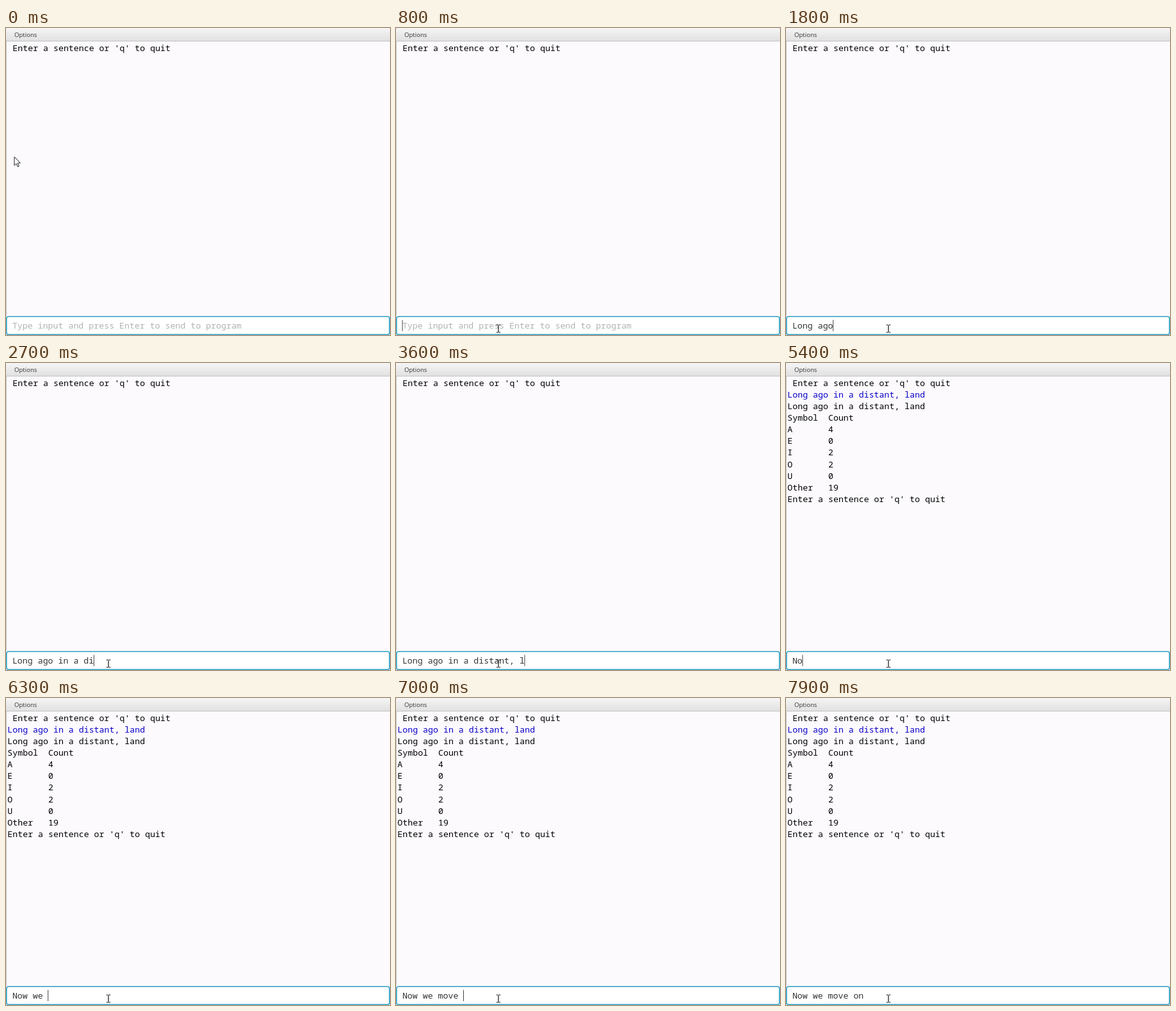
Recreate the animation shown at these times as an HTML page with a canvas. Size 600 by 479 pixels, loop 8 s.

```html
<!DOCTYPE html>
<html lang="en">
<head>
<meta charset="utf-8">
<title>Vowel counter console</title>
<style>
html, body { margin: 0; width: 100%; height: 100%; overflow: hidden; background: #fcfafd; }
canvas { display: block; }
</style>
</head>
<body>
<canvas id="stage"></canvas>
<script>
const W = 600, H = 479, LOOP = 8000, STEP = 100;
const MONO = '13.27px "Noto Sans Mono", "DejaVu Sans Mono", monospace';
const MENU = '9.6px "Open Sans", "Noto Sans", sans-serif';
const CHAR = 7.96, LINE = 18.15, ENTER = 4300;

const canvas = document.getElementById('stage');
const ctx = canvas.getContext('2d');
const dpr = window.devicePixelRatio || 1;
canvas.width = W * dpr;
canvas.height = H * dpr;
canvas.style.width = W + 'px';
canvas.style.height = H + 'px';

const PROMPT = "Enter a sentence or 'q' to quit";
const HINT = 'Type input and press Enter to send to program';
const FIRST = 'Long ago in a distant, land';
const SECOND = 'Now we move on';
const COUNTS = [['Symbol', 'Count'], ['A', 4], ['E', 0], ['I', 2], ['O', 2], ['U', 0], ['Other', 19]];
const RESULT = [FIRST, FIRST, ...COUNTS.map(([name, n]) => name.padEnd(8) + n), PROMPT];

// Runs of keystrokes, one key per step: [time of first key, number of keys]
const FIRST_KEYS = [[1100, 10], [2200, 11], [3400, 4], [3900, 2]];
const SECOND_KEYS = [[5100, 1], [5400, 3], [5800, 1], [6000, 2], [6500, 1], [6700, 4], [7200, 1], [7400, 1]];
// Spans in which the caret is hidden
const CARET_OFF = [[0, 600], [4800, 5100], [7900, 8000]];

function typed(text, runs, t) {
  let n = 0;
  for (const [start, keys] of runs) {
    if (t >= start) n += Math.min(keys, Math.floor((t - start) / STEP) + 1);
  }
  return text.slice(0, n);
}

function write(text, x, y, color, font = MONO) {
  ctx.font = font;
  ctx.fillStyle = color;
  ctx.fillText(text, x, y);
}

function rect(x, y, w, h, color) {
  ctx.fillStyle = color;
  ctx.fillRect(x, y, w, h);
}

function drawWindow() {
  rect(0, 0, W, H, '#fcfafd');
  const bar = ctx.createLinearGradient(0, 0, 0, 20);
  bar.addColorStop(0, '#f6f5f6');
  bar.addColorStop(1, '#e2e1e2');
  rect(0, 0, W, 20, bar);
  rect(0, 20, W, 1, '#c3c2c3');
  rect(0, 21, 1, 428, '#c6c5c6');
  write('Options', 13, 14, '#333', MENU);
}

function drawOutput(t) {
  write(PROMPT, 10.3, 35.5, '#000');
  if (t < ENTER) return;
  RESULT.forEach((line, i) => {
    write(line, 2.3, 35.5 + LINE * (i + 1), i ? '#000' : '#0a00c8');
  });
}

function drawInput(t) {
  ctx.beginPath();
  ctx.roundRect(0.8, 450.2, W - 1.6, 28, 3);
  ctx.fillStyle = '#fff';
  ctx.fill();
  ctx.strokeStyle = '#2fa0c6';
  ctx.lineWidth = 1.6;
  ctx.stroke();

  const text = t < ENTER ? typed(FIRST, FIRST_KEYS, t) : typed(SECOND, SECOND_KEYS, t);
  write(text || HINT, 9.9, 469.3, text ? '#333' : '#b2b1b2');
  if (!CARET_OFF.some(([a, b]) => t >= a && t < b)) {
    rect(9.5 + text.length * CHAR, 455.5, 1, 17.5, '#444');
  }
}

function drawArrow(x, y) {
  const shape = [[0, 0], [0, 13.5], [3.1, 10.7], [5.3, 15.5], [7.3, 14.6], [5.2, 9.9], [9.3, 9.6]];
  ctx.beginPath();
  shape.forEach(([dx, dy]) => ctx.lineTo(x + dx, y + dy));
  ctx.closePath();
  ctx.fillStyle = '#fff';
  ctx.fill();
  ctx.strokeStyle = '#222';
  ctx.lineWidth = 1;
  ctx.stroke();
}

function drawBeam(x, y) {
  rect(x - 0.6, y - 5.5, 1.3, 11.5, '#222');
  for (const dy of [-6.3, 5.3]) {
    rect(x - 3.2, y + dy, 2.6, 1.1, '#222');
    rect(x + 0.7, y + dy, 2.6, 1.1, '#222');
  }
}

function drawPointer(t) {
  const p = Math.min(t / 800, 1);
  const e = p * p * (3 - 2 * p);
  const bend = (a, b, c) => (1 - e) ** 2 * a + 2 * e * (1 - e) * b + e * e * c;
  const x = bend(13, 190, 160), y = bend(201, 310, 469);
  if (y > 450) drawBeam(x, y);
  else drawArrow(x, y);
}

function frame(now) {
  const t = Math.floor((now % LOOP) / STEP) * STEP;
  ctx.setTransform(dpr, 0, 0, dpr, 0, 0);
  drawWindow();
  drawOutput(t);
  drawInput(t);
  drawPointer(t);
}

const start = performance.now();
function tick() {
  frame(performance.now() - start);
  requestAnimationFrame(tick);
}
tick();
</script>
</body>
</html>
```
